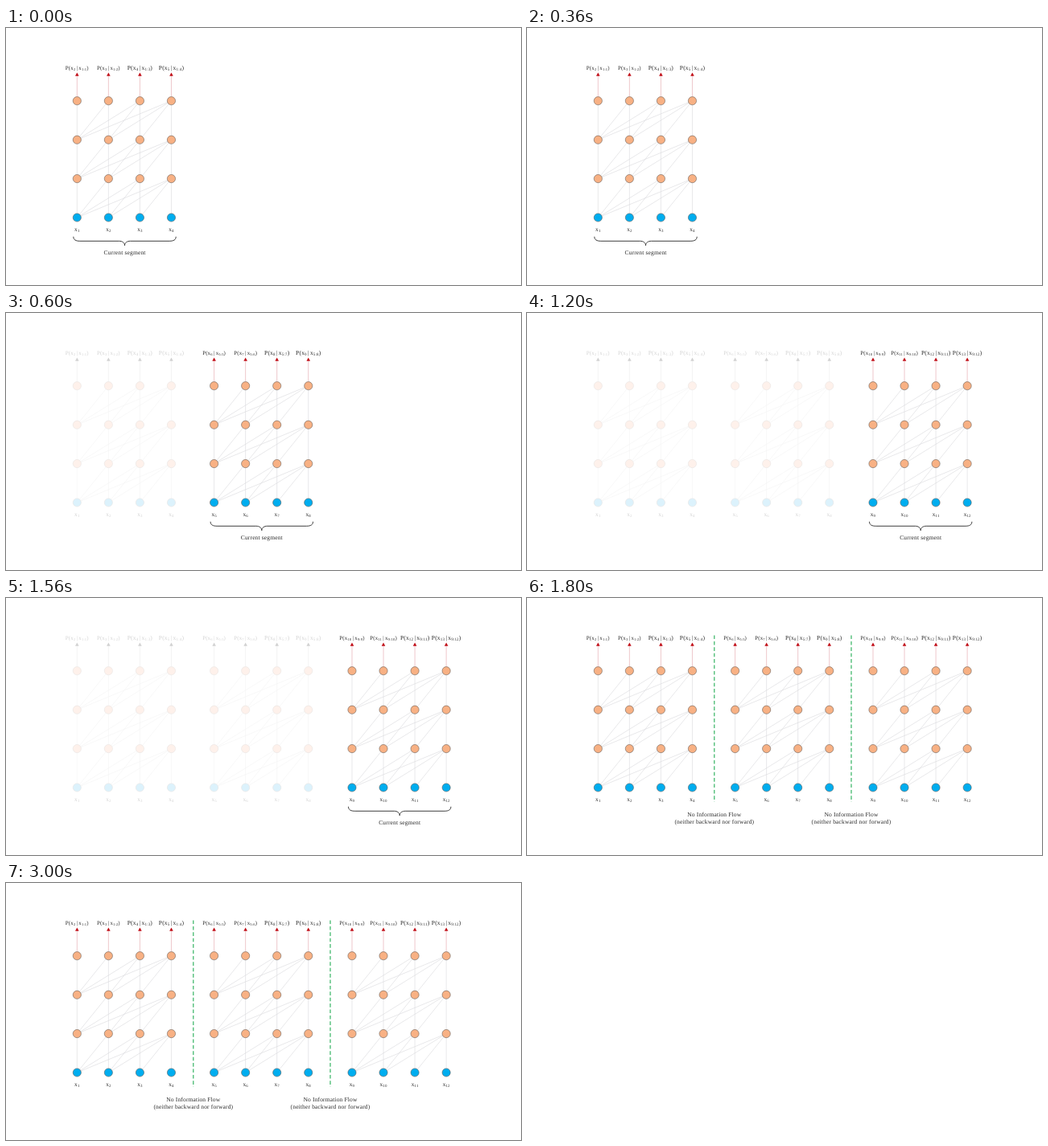
An HTML page with a canvas that plays this animation: 640 by 320 pixels, repeating every 3.8 s.

```html
<!DOCTYPE html>
<html lang="en">
<head>
<meta charset="utf-8">
<title>Segmented attention</title>
<style>
html, body { margin: 0; width: 100%; height: 100%; overflow: hidden; background: #fff; }
canvas { display: block; width: 640px; height: 320px; }
</style>
</head>
<body>
<canvas id="stage"></canvas>
<script>
const W = 640, H = 320, LOOP = 3800, STEP = 600;
const STARTS = [88.3, 258.6, 430];
const GAP = 39.05;
const ROWS = [90.7, 139.2, 187.6, 236];
const RADIUS = 5.1;
const TRACKING = 0.15;

const canvas = document.getElementById('stage');
const ctx = canvas.getContext('2d');
const ratio = window.devicePixelRatio || 1;
canvas.width = W * ratio;
canvas.height = H * ratio;

function setFont(size) {
  ctx.font = `${size}px "Liberation Serif", "Times New Roman", serif`;
  ctx.letterSpacing = TRACKING + 'px';
  ctx.textRendering = 'geometricPrecision';
}

function line(x1, y1, x2, y2) {
  ctx.beginPath();
  ctx.moveTo(x1, y1);
  ctx.lineTo(x2, y2);
  ctx.stroke();
}

function caption(text, x, y) {
  setFont(7.5);
  ctx.fillStyle = '#2a2a2a';
  ctx.textAlign = 'center';
  ctx.fillText(text, x, y);
}

// Centred run of parts; a leading "_" marks a subscript.
function formula(parts, x, y, size) {
  const runs = parts.map(part => {
    const sub = part[0] === '_';
    const text = sub ? part.slice(1) : part;
    const pad = part === '|' ? 1.25 : 0;
    const fontSize = sub ? size * 0.67 : size;
    setFont(fontSize);
    return { text, sub, pad, fontSize, width: ctx.measureText(text).width + pad * 2 };
  });
  let left = x - runs.reduce((sum, run) => sum + run.width, 0) / 2;
  ctx.textAlign = 'left';
  for (const run of runs) {
    setFont(run.fontSize);
    ctx.fillText(run.text, left + run.pad, y + (run.sub ? 1.1 : 0));
    left += run.width;
  }
}

function node(x, y, fill, faded) {
  ctx.beginPath();
  ctx.arc(x, y, RADIUS, 0, Math.PI * 2);
  ctx.fillStyle = fill;
  ctx.fill();
  ctx.strokeStyle = faded ? '#e6e2e0' : '#5a5552';
  ctx.lineWidth = 0.55;
  ctx.stroke();
}

function arrow(x, faded) {
  ctx.strokeStyle = faded ? '#ebebeb' : '#e3a3a8';
  ctx.lineWidth = 0.6;
  line(x, ROWS[0] - RADIUS, x, 59);
  ctx.fillStyle = faded ? '#d2d2d2' : '#c00d17';
  ctx.beginPath();
  ctx.moveTo(x, 55.4);
  ctx.lineTo(x + 2.3, 59.7);
  ctx.lineTo(x - 2.3, 59.7);
  ctx.fill();
}

function segment(index, faded) {
  const xs = [0, 1, 2, 3].map(i => STARTS[index] + i * GAP);
  const first = index * 4 + 1;

  ctx.strokeStyle = faded ? '#f3f3f3' : '#d9d9dc';
  ctx.lineWidth = 0.6;
  for (let row = 0; row < 3; row++)
    for (let to = 0; to < 4; to++)
      for (let from = 0; from <= to; from++)
        line(xs[from], ROWS[row + 1], xs[to], ROWS[row]);

  xs.forEach((x, i) => {
    const n = first + i;
    arrow(x, faded);
    ROWS.forEach((y, row) => {
      const fill = row === 3 ? (faded ? '#dcf2fc' : '#00adef')
                             : (faded ? '#fef1eb' : '#f8b184');
      node(x, y, fill, faded);
    });
    ctx.fillStyle = faded ? '#d3d3d3' : '#2a2a2a';
    formula(['P(x', '_' + (n + 1), '|', 'x', `_${first}:${n}`, ')'],
            x, 52.2, i < 2 ? 6.9 : 7.55);
    formula(['x', '_' + n], x, 252.8, 7.3);
  });
}

function brace(index) {
  const left = STARTS[index] - 4.5;
  const mid = STARTS[index] + 59.2;
  const right = 2 * mid - left;
  const top = 259.8, bar = 265.3, tip = 270.8;
  ctx.strokeStyle = '#1c1c1c';
  ctx.lineWidth = 0.85;
  ctx.beginPath();
  ctx.moveTo(left, top);
  ctx.bezierCurveTo(left, top + 4, left + 3, bar, left + 8, bar);
  ctx.lineTo(mid - 7, bar);
  ctx.bezierCurveTo(mid - 3, bar, mid, bar + 2, mid, tip);
  ctx.bezierCurveTo(mid, bar + 2, mid + 3, bar, mid + 7, bar);
  ctx.lineTo(right - 8, bar);
  ctx.bezierCurveTo(right - 3, bar, right, top + 4, right, top);
  ctx.stroke();
  caption('Current segment', mid, 282.4);
}

function barrier(x) {
  ctx.strokeStyle = '#35b463';
  ctx.lineWidth = 1.2;
  ctx.setLineDash([4.6, 2.8]);
  line(x, 46.5, x, 254);
  ctx.setLineDash([]);
  caption('No Information Flow', x, 272);
  caption('(neither backward nor forward)', x, 281);
}

function draw(time) {
  const stage = Math.min(3, Math.floor(time / STEP));
  ctx.setTransform(ratio, 0, 0, ratio, 0, 0);
  ctx.fillStyle = '#fff';
  ctx.fillRect(0, 0, W, H);
  for (let i = 0; i <= Math.min(stage, 2); i++)
    segment(i, stage < 3 && i < stage);
  if (stage < 3) brace(stage);
  else [232.8, 403].forEach(barrier);
}

const start = performance.now();
function tick() {
  draw((performance.now() - start) % LOOP);
  requestAnimationFrame(tick);
}
tick();
</script>
</body>
</html>
```
